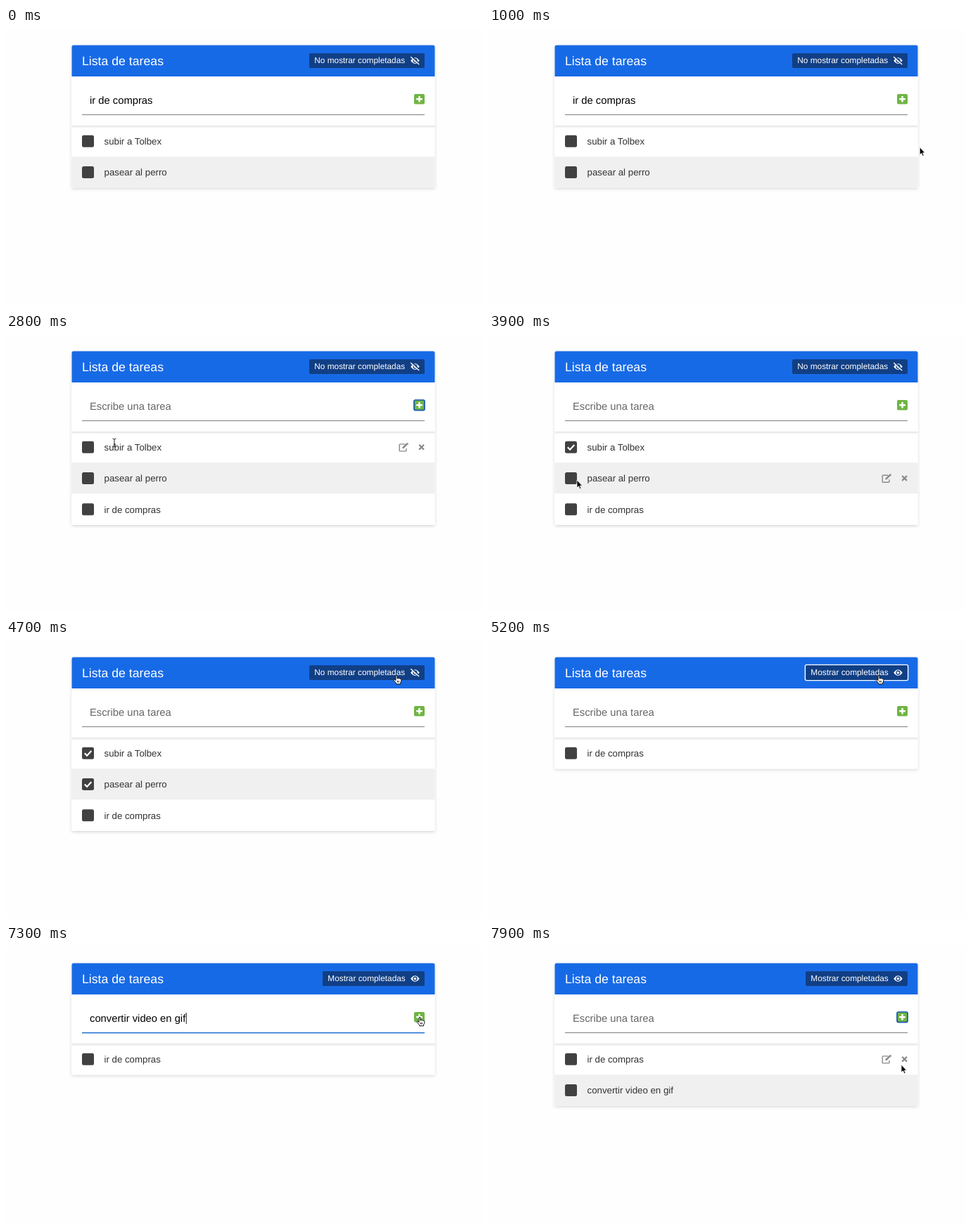
These frames come from a looping animation (678 by 396 pixels, 8000 ms). An HTML page:

```html
<!DOCTYPE html>
<html lang="es">
<head>
<meta charset="utf-8">
<title>Lista de tareas</title>
<style>
html, body { margin: 0; width: 100%; height: 100%; overflow: hidden; background: #fefefe; }
svg { display: block; width: 678px; height: 396px; }
text { font-family: "Liberation Sans", Arial, sans-serif; text-rendering: geometricPrecision; white-space: pre; }
</style>
</head>
<body>
<svg id="stage" viewBox="0 0 678 396">
  <defs>
    <filter id="shadow" x="-5%" y="-10%" width="110%" height="120%">
      <feDropShadow dx="0" dy="1.5" stdDeviation="2" flood-opacity=".17"/>
    </filter>
    <g id="edit" fill="none" stroke="#8a8a8a" stroke-width="1.4">
      <path d="M9 2H1.8Q.9 2 .9 2.9V11Q.9 12 1.8 12H9.800Q10.700 12 10.700 11V8"/>
      <path d="M5 8.200L5.300 6.200L10.800.8L12.600 2.600L7.100 8Z" fill="#8a8a8a" stroke="none"/>
      <path d="M11.200.4L13.300 2.400" stroke-width="1.800"/>
    </g>
    <g id="eye">
      <path d="M0 4.500Q6.200-4.200 12.500 4.500Q6.200 13.200 0 4.500Z" fill="#fff"/>
      <circle cx="6.250" cy="4.500" r="2.500" fill="#fff" stroke="#113f85" stroke-width="1.300"/>
    </g>
    <path id="arrow" d="M0 0V11L2.500 8.800L4.200 12.700L6 11.900L4.300 8.200H7.600Z" fill="#000" stroke="#fff" stroke-width=".8"/>
    <path id="hand" d="M-1 1Q0-.8 1 1V5Q2.300 3.600 3.200 5Q4.400 4 5.100 5.500Q6.700 4.800 6.900 6.500Q7 9.500 5.600 11V12.800H-.3V11.500L-3.800 7.600Q-4 5.800-2.300 6.500L-1 7.700ZM1.500 8V10.500M3.300 8V10.500" fill="#fff" stroke="#111" stroke-width="1"/>
    <path id="beam" d="M-2.500-6Q0-6 0-4.500Q0-6 2.500-6M0-4.500V4.500M-2.500 6Q0 6 0 4.500Q0 6 2.500 6M-1.300 2H1.300" fill="none" stroke="#222" stroke-width="1"/>
  </defs>
  <g id="scene"></g>
</svg>
<script>
const LOOP = 8000, STEP = 100;
const LEFT = 93.5, RIGHT = 609.5, LIST_TOP = 139, ROW = 44.3;
const NEW_TASK = 'convertir video en gif';
const scene = document.getElementById('scene');

// Pointer stops: time, x, y
const stops = [
  [100, 642, 256], [900, 614, 175], [1500, 590, 103], [1800, 589, 101],
  [2100, 589, 101], [2800, 154, 155], [3200, 117, 161], [3500, 117, 161],
  [3900, 125, 208], [4050, 118, 206], [4200, 118, 206], [4700, 555, 50],
  [5200, 554, 50], [5650, 546, 103], [6300, 546, 103], [6450, 546, 125],
  [6850, 546, 125], [7300, 588, 101], [7500, 588, 101], [7900, 586, 169]
];

const rect = (x, y, w, h, fill, extra = '') =>
  `<rect x="${x}" y="${y}" width="${w}" height="${h}" fill="${fill}" ${extra}/>`;
const text = (x, y, size, fill, value) =>
  `<text x="${x}" y="${y}" font-size="${size}" fill="${fill}">${value}</text>`;
const use = (id, x, y) => `<use href="#${id}" x="${x}" y="${y}"/>`;
const line = (d, color, width) =>
  `<path d="${d}" fill="none" stroke="${color}" stroke-width="${width}"/>`;
const inside = (p, x1, y1, x2, y2) => p.x >= x1 && p.x < x2 && p.y >= y1 && p.y < y2;

function pointerAt(t) {
  const next = stops.findIndex(s => s[0] > t);
  if (next < 0) return { x: 586, y: 169 };
  if (next === 0) return { x: -50, y: -50 };
  const [t0, x0, y0] = stops[next - 1], [t1, x1, y1] = stops[next];
  const u = (t - t0) / (t1 - t0), e = u * u * (3 - 2 * u);
  return { x: x0 + (x1 - x0) * e, y: y0 + (y1 - y0) * e };
}

function stateAt(t) {
  const hideDone = t >= 4900;
  const tasks = [
    { name: 'subir a Tolbex', done: t >= 3300 },
    { name: 'pasear al perro', done: t >= 4100 }
  ];
  if (t >= 1900) tasks.push({ name: 'ir de compras' });
  if (t >= 7500) tasks.push({ name: NEW_TASK });
  const typed = Math.round(Math.max(0, Math.min(1, (t - 5950) / 500)) * NEW_TASK.length);
  return {
    hideDone,
    tasks: tasks.filter(task => !(hideDone && task.done)),
    value: t < 1900 ? 'ir de compras' : t < 7500 ? NEW_TASK.slice(0, typed) : '',
    inputFocus: t >= 5700 && t < 7500,
    caret: t < 6900 || t >= 7300,
    addFocus: (t >= 1700 && t < 3300) || t >= 7500,
    toggleFocus: hideDone && t < 5700,
    pointer: pointerAt(t),
    pointerHidden: t < 100 || (t >= 6000 && t < 6400)
  };
}

function header(s) {
  const x = s.hideDone ? 450 : 431;
  const border = s.toggleFocus ? 'stroke="#fff" stroke-width="1.4"' : '';
  const grow = s.toggleFocus ? 0.6 : 0;
  return `<path d="M${LEFT} 69V27Q${LEFT} 24.500 96 24.500H607Q${RIGHT} 24.500 ${RIGHT} 27V69Z" fill="#176ae6"/>` +
    text(108, 52.5, 17.7, '#fff', 'Lista de tareas') +
    rect(x - grow, 36 - grow, 595 - x + 2 * grow, 21 + 2 * grow, '#113f85', 'rx="2" ' + border) +
    text(x + 7.3, 50.4, 11.83, '#fff', s.hideDone ? 'Mostrar completadas' : 'No mostrar completadas') +
    use('eye', 575.2, 42) +
    (s.hideDone ? '' : line('M576.400 41L588 51.600', '#113f85', 2.6) + line('M575.200 41L587.200 52', '#fff', 1.3));
}

function form(s) {
  const blue = '#1b6fd0';
  return rect(LEFT, 69, 516, 70, '#fff') +
    text(119, 108, 14.77, s.value ? '#000' : '#666', s.value || (s.inputFocus ? '' : 'Escribe una tarea')) +
    (s.inputFocus && !s.value ? text(119, 108, 14.77, '#666', 'Escribe una tarea') : '') +
    rect(108, 122.9, 487, s.inputFocus ? 1.5 : 1.2, s.inputFocus ? blue : '#8c8c8c') +
    rect(580, 94, 15, 14.6, '#70b544', 'rx="2" ' + (s.addFocus ? 'stroke="#1657ae" stroke-width="1.700"' : '')) +
    line('M587.500 97V105.600M583.200 101.300H591.800', '#fff', 2.4);
}

function row(task, i, hover) {
  const y = LIST_TOP + i * ROW, mid = y + 22.2;
  return rect(LEFT, y, 516, ROW, i % 2 ? '#f0f0f0' : '#fff') +
    rect(108, mid - 8.5, 17, 17, '#414141', 'rx="2.500"') +
    (task.done ? line(`M111.800 ${mid}l3.300 3.500l6.200-6.800`, '#fff', 2.2) : '') +
    text(139.5, mid + 4.8, 13.27, '#333', task.name) +
    (hover ? use('edit', 558.3, mid - 6.3) +
      line(`M587.200 ${mid - 3.4}l6.800 6.800m0-6.800l-6.800 6.800`, '#8a8a8a', 2.2) : '');
}

function cursorKind(s, hovered) {
  const p = s.pointer, y = LIST_TOP + hovered * ROW + 22.2;
  const overTask = hovered >= 0;
  if (inside(p, s.hideDone ? 450 : 431, 36, 595, 57) || inside(p, 580, 94, 595, 109)) return 'hand';
  if (overTask && (inside(p, 108, y - 8.5, 124.5, y + 8.5) ||
      inside(p, 558, y - 7, 573, y + 7) || inside(p, 586, y - 5, 595, y + 5))) return 'hand';
  if (inside(p, 108, 86, 575, 123) || inside(p, 108, 37, 224, 57)) return 'beam';
  if (overTask && inside(p, 139, y - 8, 228, y + 8)) return 'beam';
  return 'arrow';
}

function draw(t) {
  const s = stateAt(t), p = s.pointer;
  const bottom = LIST_TOP + s.tasks.length * ROW;
  const hovered = !s.pointerHidden && inside(p, LEFT, LIST_TOP, RIGHT, bottom)
    ? Math.floor((p.y - LIST_TOP) / ROW) : -1;
  scene.innerHTML =
    rect(LEFT, 25, 516, bottom - 25, '#fff', 'rx="2.500" filter="url(#shadow)"') +
    s.tasks.map((task, i) => row(task, i, i === hovered)).join('') +
    rect(LEFT, LIST_TOP, 516, 1.5, '#000', 'opacity=".1"') +
    rect(LEFT, LIST_TOP + 1.5, 516, 2, '#000', 'opacity=".035"') +
    header(s) + form(s) +
    (s.pointerHidden ? '' : use(cursorKind(s, hovered), p.x, p.y));
  if (s.inputFocus && s.caret) {
    const value = scene.querySelectorAll('text')[s.tasks.length + 2];
    const x = 119.5 + (s.value ? value.getComputedTextLength() : 0);
    scene.insertAdjacentHTML('beforeend', rect(x, 95, 1, 16, '#222'));
  }
}

let lastStep = -1;
function tick() {
  const t = Math.floor(performance.now() % LOOP / STEP) * STEP;
  if (t !== lastStep) draw(lastStep = t);
  requestAnimationFrame(tick);
}
tick();
</script>
</body>
</html>
```
